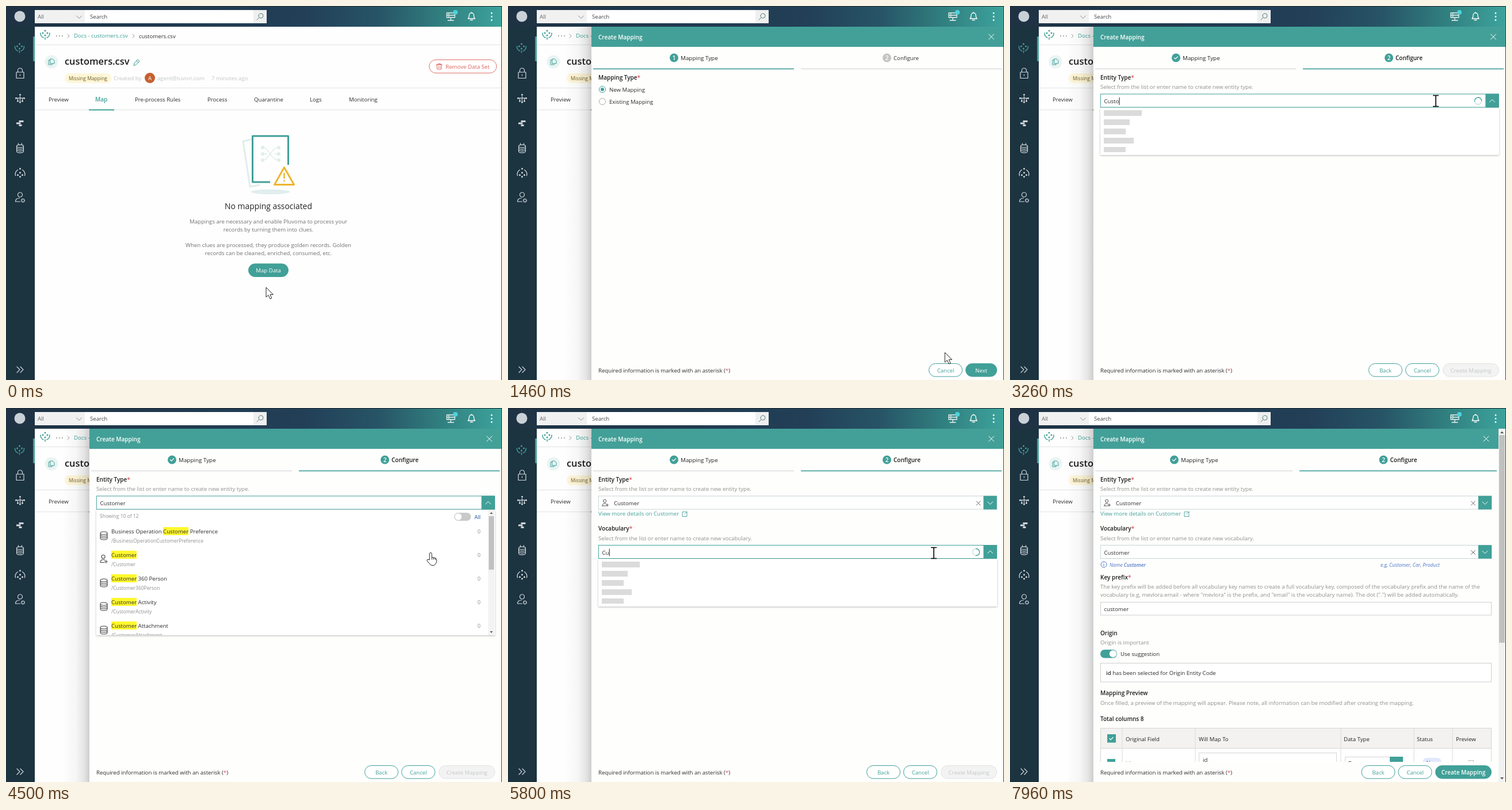
Write an HTML page that moves like this. It is 862 by 650 pixels and loops after 8000 ms.

```html
<!DOCTYPE html>
<html lang="en">
<head>
<meta charset="utf-8">
<title>Create mapping</title>
<style>
html, body { margin: 0; width: 100%; height: 100%; overflow: hidden; background: #fdfefd; }
svg { display: block; width: 862px; height: 650px; }
text { font: 9.65px "Open Sans", "Noto Sans", sans-serif; fill: #2c2c2c; white-space: pre; }
.b { font-weight: 600; font-size: 10px; fill: #1c1c1c; }
.small { font-size: 8.5px; }
.muted { fill: #8f8f8f; }
.soft { fill: #c3c6c6; }
.teal { fill: #41a098; }
.white { fill: #fff; }
.mid { text-anchor: middle; }
.hint { font-size: 8.6px; font-style: italic; fill: #4f78c4; }
.red { fill: #e0505a; }
.line { fill: none; stroke: currentColor; stroke-linecap: round; stroke-linejoin: round; }
</style>
</head>
<body>
<svg viewBox="0 0 862 650">
  <defs>
    <linearGradient id="bar">
      <stop offset="0" stop-color="#1e3243"/><stop offset=".6" stop-color="#223f57"/>
      <stop offset=".75" stop-color="#275466"/><stop offset=".88" stop-color="#318080"/>
      <stop offset="1" stop-color="#3da39c"/>
    </linearGradient>
    <linearGradient id="shade">
      <stop offset="0" stop-color="#000" stop-opacity="0"/>
      <stop offset=".5" stop-color="#000" stop-opacity=".03"/>
      <stop offset=".8" stop-color="#000" stop-opacity=".1"/>
      <stop offset="1" stop-color="#000" stop-opacity=".19"/>
    </linearGradient>
    <filter id="drop" x="-5%" y="-5%" width="110%" height="115%">
      <feDropShadow dx="0" dy="1" stdDeviation="1.5" flood-opacity=".28"/>
    </filter>
    <clipPath id="entityClip"><rect x="157" y="177" width="693" height="218"/></clipPath>
    <clipPath id="vocabClip"><rect x="157" y="263" width="693" height="218"/></clipPath>
    <clipPath id="tableClip"><rect x="150" y="550" width="695" height="65"/></clipPath>
  </defs>
  <g id="page"></g>
  <g id="panel"></g>
  <g id="cursor"></g>
</svg>
<script>
const LOOP = 8000, TEAL = '#41a098', WORD = 'Customer';
const $ = id => document.getElementById(id);
const clamp = v => Math.max(0, Math.min(1, v));
const easeOut = p => 1 - (1 - p) ** 3;
const easeInOut = p => p * p * (3 - 2 * p);

const ruler = document.createElement('canvas').getContext('2d');
function widthOf(s) {
  ruler.font = '9.65px "Open Sans", "Noto Sans", sans-serif';
  return ruler.measureText(s).width;
}

// Drawing helpers, each returning markup
const text = (x, y, s, cls = '', more = '') => `<text x="${x}" y="${y}" class="${cls}" ${more}>${s}</text>`;
const rect = (x, y, w, h, fill, more = '') => `<rect x="${x}" y="${y}" width="${w}" height="${h}" fill="${fill}" ${more}/>`;
const dot = (x, y, r, fill, more = '') => `<circle cx="${x}" cy="${y}" r="${r}" fill="${fill}" ${more}/>`;
const line = (d, color, w = 1, more = '') => `<path class="line" d="${d}" color="${color}" stroke-width="${w}" ${more}/>`;
const at = (x, y, s) => `<g transform="translate(${x} ${y})">${s}</g>`;
const cross = (x, y, r, c) => line(`M${x - r} ${y - r}l${2 * r} ${2 * r}m0 ${-2 * r}l${-2 * r} ${2 * r}`, c);
const chevron = (x, y, up, c) => line(`M${x - 4.5} ${y + (up ? 2 : -2)}l4.5 ${up ? -4.5 : 4.5}l4.5 ${up ? 4.5 : -4.5}`, c);
const check = (x, y, c) => line(`M${x - 3} ${y}l2 2.2l4 -4.2`, c, 1.2);
const star = '<tspan class="red">*</tspan>';
const pill = (x, y, w, label, fill, stroke, cls) =>
  rect(x + .5, y + .5, w - 1, 22.5, fill, `rx="11.2" stroke="${stroke}"`) + text(x + w / 2, y + 15.5, label, cls + ' mid');

const icons = {
  hub: c => [[0, -7], [-4, -3], [4, -3], [0, 1]].map(p => dot(...p, 1.5, c)).join('') +
    line('M-8 -3q0 6 5 8M8 -3q0 6 -5 8M0 5v3', c, 1.5),
  lock: c => line('M-6.500 -2h13v10.500h-13zM-4 -2v-3a4 4 0 0 1 8 0v3M0 2v2', c, 1.2),
  tree: c => line('M-7 0h14M0 -3v10M-4 0v4M4 0v4', c, 1.2) +
    [[0, -6], [-7, 0], [7, 0], [-4, 5], [4, 5], [0, 7]].map(p => dot(...p, 1.5, c)).join(''),
  blocks: c => rect(-2, -4.5, 8, 3, c) + rect(-6.5, -1, 7.5, 3, c) + rect(-2, 2.5, 5, 3, c),
  store: c => line('M-6 -3v9a6 2.5 0 0 0 12 0v-9M-6 0a6 2.5 0 0 0 12 0M-6 3a6 2.5 0 0 0 12 0M-6 -3a6 2.5 0 0 1 12 0a6 2.5 0 0 1 -12 0M-3 -8v2M3 -8v2', c, 1.1),
  arc: c => line('M-8 5a8.5 8.5 0 0 1 4 -10M8 5a8.5 8.5 0 0 0 -4 -10', c, 1.3) +
    [[0, -7], [0, 0], [-4, 4], [4, 4], [0, 7]].map(p => dot(...p, 1.5, c)).join(''),
  user: c => line('M-4 -5a4 4 0 1 0 8 0a4 4 0 1 0 -8 0M-8 7q0 -6 7 -6M-8 7h8', c, 1.2) +
    dot(5, 5, 2.6, 'none', `stroke="${c}" stroke-width="1.8" stroke-dasharray="1.6 .6"`),
  db: c => line('M-6 -4v9a6 2.5 0 0 0 12 0v-9M-6 -1a6 2.5 0 0 0 12 0M-6 2a6 2.5 0 0 0 12 0M-6 -4a6 2.5 0 0 1 12 0a6 2.5 0 0 1 -12 0', c, 1.1),
  addUser: c => line('M-4 -4a3 3 0 1 0 6 0a3 3 0 1 0 -6 0M-6 6q0 -5 5 -5q2 0 3 1M-6 6h7M4 2v5M1.5 4.5h5', c, 1.1),
  copy: c => line('M-2 -5h4l3 3v5h-7zM-2 -3h-3v8h6v-2', c),
  pencil: c => line('M-5 5l1 -4l6 -6l3 3l-6 6zM0 -3l3 3', c),
  trash: c => line('M-4 -3h8l-.7 8h-6.600zM-5 -3h10M-2 -3v-2h4v2M-1.300 0v3M1.300 0v3', c, .9),
  link: c => line('M0 -4h-4v8h8v-4M1 -4h3v3M4 -4l-4 4', c, .9)
};
const icon = (name, x, y, c) => at(x, y, icons[name](c));

function pageMarkup() {
  const light = '#d3dadd', grey = '#e2e4e4';
  const sidebar = ['lock', 'tree', 'blocks', 'store', 'arc', 'user']
    .map((name, i) => icon(name, 24.5, 117 + 43.2 * i, light)).join('');
  const tabs = [[74, 'Preview'], [224, 'Pre-process Rules'], [350, 'Process'], [431, 'Quarantine'], [528, 'Logs'], [596, 'Monitoring']]
    .map(([x, s]) => text(x, 166, s)).join('');
  const copy = [[378, 'Mappings are necessary and enable Pluvoma to process your'], [391.5, 'records by turning them into clues.'],
    [419, 'When clues are processed, they produce golden records. Golden'], [433, 'records can be cleaned, enriched, consumed, etc.']]
    .map(([y, s]) => text(456, y, s, 'mid', 'style="fill:#707070"')).join('');
  const art = line('M426 232L412 235L424 314L440 311', '#e0eeed', 3) + `<ellipse cx="459.500" cy="323" rx="34" ry="4.200" fill="#e0eeed"/>` +
    line('M459 306H428.500V226H490.500V276', TEAL, 3, 'style="stroke-linecap:butt"') +
    [246, 257, 268].map(y => dot(446, y, 3, '#e0eeed') + dot(474, y, 3, '#e0eeed')).join('') +
    line('M446 246C458 246 460 268 474 268M446 268C458 268 460 246 474 246M446 257h7M467 257h7', '#e0eeed', 1.5) +
    line('M483.500 280.500L500.500 310.500H466.500Z', '#eeb530', 3) + line('M483.500 291v8M483.500 303.500v.5', '#eeb530', 2.5);
  return rect(0, 0, 862, 650, '#fdfefd') +
    rect(0, 0, 862, 36, 'url(#bar)') + rect(0, 36, 50, 614, '#1c3340') +
    dot(24, 18, 9.5, '#c9d1d6') +
    rect(50, 7, 87, 23, '#f1f1f1') + rect(137, 7, 293, 23, '#fff') + rect(430, 7, 23, 23, '#efefef') +
    text(55, 21.5, 'All', '', 'style="fill:#666"') + chevron(127, 19, false, '#888') + text(146, 22, 'Search', '', 'style="fill:#444"') +
    line('M439 17a4 4 0 1 0 8 0a4 4 0 1 0 -8 0M440 20l-4 4', '#55807f') +
    line('M766 12h14v4h-14zM766 16h14v4h-14zM773 20v5M768 25h10M769 14h1M769 18h1', '#eef5f5', 1.3) + dot(781, 11, 4, '#4ed2dc') +
    line('M803 22q2 -2 2 -6a4 4 0 0 1 8 0q0 4 2 6zM807 24.500h4M809 11v1', '#fff', 1.3) +
    [12.5, 18.5, 24.5].map(y => dot(844, y, 1.4, '#fff')).join('') +
    icon('hub', 23.5, 73, TEAL) + rect(47, 53, 3, 43, TEAL) + sidebar +
    line('M19 627l5 5l-5 5M25 627l5 5l-5 5', light, 1.2) +
    rect(50, 67, 812, 1, grey) + rect(50, 142, 812, 1, grey) + rect(50, 180, 812, 1, grey) +
    icon('hub', 68, 50, TEAL) + [88, 93, 98].map(x => dot(x, 52, .9, '#888')).join('') +
    line('M107 49l3 3l-3 3M220 49l3 3l-3 3', '#999') +
    text(118, 55, 'Docs - customers.csv', 'teal') + text(231, 55.5, 'customers.csv') +
    dot(79, 97, 11.5, '#e9f4f3') + icon('copy', 79, 97, TEAL) +
    text(102, 102, 'customers.csv', 'b', 'style="font-size:16.4px"') + icon('pencil', 227, 98, TEAL) +
    rect(102, 117, 81, 17, '#fff6d8', 'rx="8.5"') + text(109, 128.5, 'Missing Mapping', '', 'style="font-size:8.5px;fill:#6b5c25"') +
    text(187, 129, 'Created by', 'soft') + dot(250, 125, 9, '#c5602f') + text(250, 129, 'A', 'white mid') +
    text(263, 129, 'agent@tuvori.com', 'soft') + text(357, 129, '7 minutes ago', 'soft') +
    rect(735.5, 93.5, 117, 23, '#fff', 'rx="11.5" stroke="#de7068"') + icon('trash', 753, 105, '#de6058') +
    text(764, 109, 'Remove Data Set', '', 'style="fill:#de6058"') +
    tabs + text(155, 166, 'Map', 'b teal') + rect(144, 179.5, 44, 2, TEAL) +
    art + text(456, 353, 'No mapping associated', 'mid', 'style="font-size:13.9px;fill:#222"') + copy +
    pill(421, 447.5, 70, 'Map Data', TEAL, TEAL, 'white') +
    rect(861, 0, 1, 650, '#3a3f42') + rect(0, 0, 862, 1, '#1d262d');
}

function loading(t) {
  const turn = Math.floor((t - 630) / 100);
  let bars = '';
  for (let k = 0; k < 8; k++) {
    const fade = ((k - turn + 23) % 8) / 8;
    bars += line('M0 -17.500V-41', TEAL, 6, `opacity="${.05 + fade}" transform="translate(503 144) rotate(${k * 45})"`);
  }
  return bars + text(497, 226.5, 'Fetching data', 'mid', 'style="font-size:8.2px;fill:#777"');
}

function steps(second, narrow) {
  const shift = narrow ? 6 : 0, x1 = narrow ? 285.5 : 288.5, x2 = narrow ? 649 : 658.5;
  const mark = (x, s, active) => dot(x, 90, 7.5, active ? TEAL : '#c4c4c4') +
    (s ? text(x, 93.5, s, 'b white mid') : check(x, 90, '#fff'));
  return rect(148, 108.5, 349 - shift, 1.6, second ? '#dedfdf' : TEAL) +
    rect(509 - shift, 108.5, 349 - shift, 1.6, second ? TEAL : '#dedfdf') +
    mark(x1, second ? '' : '1', true) + text(x1 + 11.5, 94, 'Mapping Type', '', 'style="font-size:9.85px;fill:#222"') +
    mark(x2, '2', second) + text(x2 + 11.5, 94, 'Configure', second ? 'b' : '');
}

const note = () => text(157, 637, `Required information is marked with an asterisk (${star})`);

function footer(dx, ready) {
  return note() + pill(623 - dx, 621, 59, 'Back', '#fff', TEAL, 'teal') + pill(687 - dx, 621, 59, 'Cancel', '#fff', TEAL, 'teal') +
    (ready ? pill(739, 621, 98, 'Create Mapping', TEAL, TEAL, 'b white') : pill(752, 621, 98, 'Create Mapping', '#f3f3f3', '#e2e2e2', 'soft'));
}

function typeStep() {
  const option = (y, s, on) => dot(164, y, 5.5, '#fff', `stroke="${on ? TEAL : '#aaa'}"`) + (on ? dot(164, y, 3, TEAL) : '') + text(176, y + 3.5, s);
  return steps(false) + text(157, 127.5, `Mapping Type${star}`, 'b') + option(145, 'New Mapping', true) + option(166, 'Existing Mapping', false) +
    note() + pill(731, 621, 59, 'Cancel', '#fff', TEAL, 'teal') + pill(795, 621, 55, 'Next', TEAL, TEAL, 'white');
}

const caption = (y, label, help) => text(157, y, label + star, 'b') + text(157, y + 16.5, help, 'muted');

function field(y, right, { value = '', hint = '', open, caret, picked, person, busy }, t) {
  const x = person ? 184 : 163.5;
  return rect(157.3, y, right - 158, 23, '#fff', `stroke="${open ? TEAL : '#c9d6d6'}"`) +
    rect(right - 23.7, y - .3, 23.3, 23.6, TEAL) + chevron(right - 12, y + 12, open, '#fff') +
    text(x, y + 16, value || hint, value ? '' : 'soft') +
    (person ? at(169, y + 12, `<g transform="scale(.85)">${icons.addUser('#444')}</g>`) : '') +
    (picked ? cross(right - 32.5, y + 12.5, 3.5, '#666') : '') +
    (caret ? rect(x + widthOf(value) + .3, y + 6, 1, 13, '#222') : '') +
    (busy ? dot(813.5, y + 12, 6, 'none', `stroke="${TEAL}" stroke-dasharray="1.200 1.200"`) +
      line('M0 -6a6 6 0 0 1 0 12', TEAL, 1.3, `transform="translate(813.500 ${y + 12}) rotate(${Math.floor((t - 5800) / 40) * 24})"`) : '');
}

const sheet = (y, h) => rect(157, y, 693, h, '#fff', 'filter="url(#drop)"');
const skeleton = y => sheet(y, 82) +
  [66, 45, 38, 52, 38].map((w, i) => rect(163, y + 4 + 16 * i, w, i < 4 ? 10 : 9, '#dbdbdb')).join('');
const scroller = (y, thumb) => rect(838, y, 11, 218, '#f3f3f3') + rect(839, y + 11, 9, thumb, '#c1c1c4') +
  `<path d="M841 ${y + 7}l2.500 -3l2.500 3zM841 ${y + 211}l2.500 3l2.500 -3z" fill="#555"/>`;

function itemName(x, y, name, found) {
  if (!found) return text(x, y, name);
  const [before, after] = name.split(WORD), hit = x + widthOf(before), w = widthOf(WORD);
  return rect(hit, y - 11, w, 14, '#fff82e') + text(x, y, before) + text(hit, y, WORD) + text(hit + w, y, after);
}

const PEOPLE = ['Business Operation Customer Preference', 'Customer 360 Person', 'Customer Activity', 'Customer Attachment', 'Customer Identifier', 'Customer Identifier Type'];
const GENERAL = ['Account', 'Activity', 'Address', 'Calendar', 'Contact', 'Document'];

function entityList(found) {
  const names = found ? [PEOPLE[0], WORD, ...PEOPLE.slice(1, 4)] : GENERAL.slice(0, 5);
  const rows = names.map((name, i) => {
    const y = 218 + 41 * i;
    return icon(name === WORD ? 'addUser' : 'db', 170, y + 3.5, '#444') + itemName(183, y, name, found) +
      text(183, y + 16, '/' + name.replaceAll(' ', ''), 'small muted') + text(822, y - .5, '0', 'muted mid');
  }).join('');
  return sheet(177, 218) + `<g clip-path="url(#entityClip)">` + text(163, 191, `Showing 10 of ${found ? 12 : 48}`, 'small muted') +
    rect(779, 182, 29, 14, '#c9c9c9', 'rx="7"') + dot(786, 189, 6.3, '#fff', 'stroke="#c9c9c9"') +
    text(814, 192.5, 'All', '', 'style="fill:#1c5c9c"') + rows + scroller(177, 93) + '</g>';
}

function vocabList(found) {
  const top = found ? 328.5 : 304;
  const rows = (found ? PEOPLE : GENERAL).map((name, i) => {
    const y = top + 30.7 * i;
    return dot(172, y - 4, 8.5, '#3f8d58') + itemName(186, y, name, found);
  }).join('');
  return sheet(263, 218) + `<g clip-path="url(#vocabClip)">` +
    (found ? rect(157, 263, 681, 23.5, '#f3f9fa') + text(163, 278, `Create "${WORD}"`) : '') +
    text(163, found ? 302 : 278, `Showing 10 of ${found ? 11 : 52}`, 'small muted') + rows + scroller(263, 111) + '</g>';
}

const typed = (t, start, pace) => WORD.slice(0, Math.max(0, Math.floor((t - start) / pace) + 1));
const ENTITY_HELP = 'Select from the list or enter name to create new entity type.';
const VOCAB_HELP = 'Select from the list or enter name to create new vocabulary.';
const chosenEntity = right => caption(127.5, 'Entity Type', ENTITY_HELP) + field(153, right, { value: WORD, picked: true, person: true }) +
  text(157, 187, 'View more details on Customer', 'teal') + icon('link', 307, 184.5, TEAL);

function configure(t) {
  const chosen = t >= 4560, drop = chosen ? 14 : 0;
  const entityOpen = t >= 2600 && !chosen, vocabOpen = t >= 5030 && t < 7230;
  const entityWait = entityOpen && (t < 2750 || (t >= 2950 && t < 3570));
  const vocabWait = vocabOpen && (t < 5250 || (t >= 5640 && t < 6400));
  let out = steps(true) + footer(0, false);
  out += chosen ? chosenEntity(850) : caption(127.5, 'Entity Type', ENTITY_HELP) +
    field(153, 850, { value: typed(t, 2950, 70), hint: 'Entity Type', open: entityOpen, caret: entityOpen && t < 4300, busy: entityWait }, t);
  out += caption(199 + drop, 'Vocabulary', VOCAB_HELP) +
    field(224.5 + drop, 850, { value: typed(t, 5640, 95), hint: 'Vocabulary', open: vocabOpen, caret: vocabOpen, busy: vocabWait, picked: t >= 7230 }, t);
  if (entityOpen) out += entityWait ? skeleton(177) : entityList(t >= 3570);
  if (vocabOpen) out += vocabWait ? skeleton(263) : vocabList(t >= 6400);
  return out;
}

function table(t) {
  const heads = [[201, 'Original Field'], [328, 'Will Map To'], [580, 'Data Type'], [707, 'Status'], [775, 'Preview']];
  const edge = 'stroke="#d5d5d5"', shown = clamp((Math.floor((t - 7730) / 35) + 1) / 3);
  return `<g clip-path="url(#tableClip)">` + rect(157.5, 556.5, 679, 80, '#fff', edge) + rect(157.5, 556.5, 679, 35, '#f3f2f1', edge) +
    [194.5, 321.5, 574.5, 701.5, 768.5].map(x => rect(x, 557, 1, 60, '#dadada')).join('') +
    heads.map(([x, s]) => text(x, 578.5, s, '', 'style="fill:#222"')).join('') +
    `<g opacity="${shown}">` + rect(169, 567, 15, 14.5, TEAL) + check(176, 574.5, '#fff') + rect(169, 610, 14, 14, TEAL) +
    text(201, 621, 'id') + rect(328.5, 599.5, 239, 23, '#fff', edge) + text(335, 615, 'id') +
    rect(582.5, 606.5, 100, 22, '#fff', edge) + rect(660, 606, 23, 23, TEAL) + text(588, 621, 'Text') +
    rect(717, 608, 33, 16, '#e1e8fb', 'rx="8"') + text(733.5, 620, 'New', 'mid', 'style="fill:#5b7bc9"') +
    rect(797.5, 612.5, 8, 8, 'none', 'stroke="#bbb"') + '</g></g>';
}

function filled(t) {
  const box = (y, h) => rect(157.5, y + .5, 679, h, '#fff', 'stroke="#cfcfcf"');
  return steps(true, true) + chosenEntity(837.5) + caption(213, 'Vocabulary', VOCAB_HELP) +
    field(238.5, 837.5, { value: WORD, picked: true }) +
    dot(163, 272, 5, 'none', 'stroke="#4f78c4"') + line('M163 271.500v3M163 269.300v.1', '#4f78c4') +
    text(173, 275.5, 'Name <tspan font-weight="600">Customer</tspan>', 'hint') + text(644, 275.5, 'e.g, Customer, Car, Product', 'hint') +
    caption(297.5, 'Key prefix', 'The key prefix will be added before all vocabulary key names to create a full vocabulary key, composed of the vocabulary prefix and the name of the') +
    text(157, 328, 'vocabulary (e.g, mevlora.email - where "mevlora" is the prefix, and "email" is the vocabulary name). The dot (".") will be added automatically.', 'muted') +
    box(337, 22.5) + text(163.5, 353, 'customer') +
    text(157, 394.5, 'Origin', 'b') + text(157, 411, 'Origin is important', 'muted') +
    rect(157, 420, 29, 14.5, TEAL, 'rx="7.2"') + dot(179, 427.2, 6.2, '#fff') + text(192, 431, 'Use suggestion') +
    box(443, 32.5) + text(167, 464, '<tspan font-weight="600">id</tspan> has been selected for Origin Entity Code') +
    text(157, 499, 'Mapping Preview', 'b') +
    text(157, 515.5, 'Once filled, a preview of the mapping will appear. Please note, all information can be modified after creating the mapping.', 'muted') +
    text(157, 544, 'Total columns 8', 'b') + table(t) + footer(12.5, true) +
    rect(849, 36, 12, 614, '#f1f1f1') + rect(850, 47, 10, 361, '#c1c1c1') +
    '<path d="M852 44l3 -3.500l3 3.500zM852 642l3 3.500l3 -3.500z" fill="#555"/>';
}

function panelMarkup(t) {
  if (t < 500) return '';
  const wide = t < 7330;
  const body = t < 660 ? loading(t) : t < 1730 ? typeStep() : wide ? configure(t) : filled(t);
  return at(716 * (1 - easeOut(clamp((t - 500) / 110))), 0,
    rect(97, 36, 48, 614, 'url(#shade)') + rect(145, 36, 716, 614, '#fefefd') + rect(145, 36, 716, 35, '#43a098') +
    text(157, 58, 'Create Mapping', 'b white') + cross(wide ? 840 : 827.5, 53.5, 4.5, '#fff') + body);
}

const track = [[0, 452, 489], [400, 452, 489], [490, 454, 457], [930, 454, 457], [1650, 822, 632], [1760, 822, 632], [2160, 769, 172],
  [2330, 740, 165], [3760, 740, 165], [4250, 738, 252], [4560, 738, 252], [4600, 740, 252], [6430, 740, 252], [7060, 735, 269], [LOOP, 735, 269]];
const looks = [[0, 'arrow'], [450, 'hand'], [660, 'arrow'], [1600, 'hand'], [1800, 'arrow'], [2240, 'beam'],
  [3820, 'hand'], [4560, 'beam'], [6550, 'hand'], [7960, 'none']];
const pointers = {
  arrow: '<path d="M0 0V17L4 13.500L7 20L9.800 18.800L7 12.500H12.300Z" fill="#fff" stroke="#222"/>',
  hand: '<path d="M-2 12V1.500a2 2 0 0 1 4 0V7.500l6 1.200q2.500 .8 2.500 4q0 4.500 -2.500 7q-1 2 -4 2q-4 0 -6 -3l-4.500 -5.500q0 -2.500 2.500 -2zM2 7.500v4M5 8.200v3.500M8 9v3" fill="#fff" stroke="#222" stroke-linejoin="round"/>',
  beam: '<path d="M-5 -9.500h4.500l.5 .5l.5 -.5h4.500M0 -9v18M-5 9.500h4.500l.5 -.5l.5 .5h4.500" fill="none" stroke="#000" stroke-width="1.600"/>',
  none: ''
};

function cursorMarkup(t) {
  const i = track.findIndex(p => p[0] > t), [t0, x0, y0] = track[i - 1], [t1, x1, y1] = track[i];
  const p = easeInOut((t - t0) / (t1 - t0));
  const look = looks.filter(l => l[0] <= t).pop()[1];
  return at(x0 + (x1 - x0) * p, y0 + (y1 - y0) * p, pointers[look]);
}

const shown = {};
function put(id, markup) {
  if (shown[id] !== markup) $(id).innerHTML = shown[id] = markup;
}

function render(t) {
  put('panel', panelMarkup(t));
  put('cursor', cursorMarkup(t));
}

put('page', pageMarkup());
render(0);
const begin = performance.now();
(function tick() {
  render((performance.now() - begin) % LOOP);
  requestAnimationFrame(tick);
})();
</script>
</body>
</html>
```
